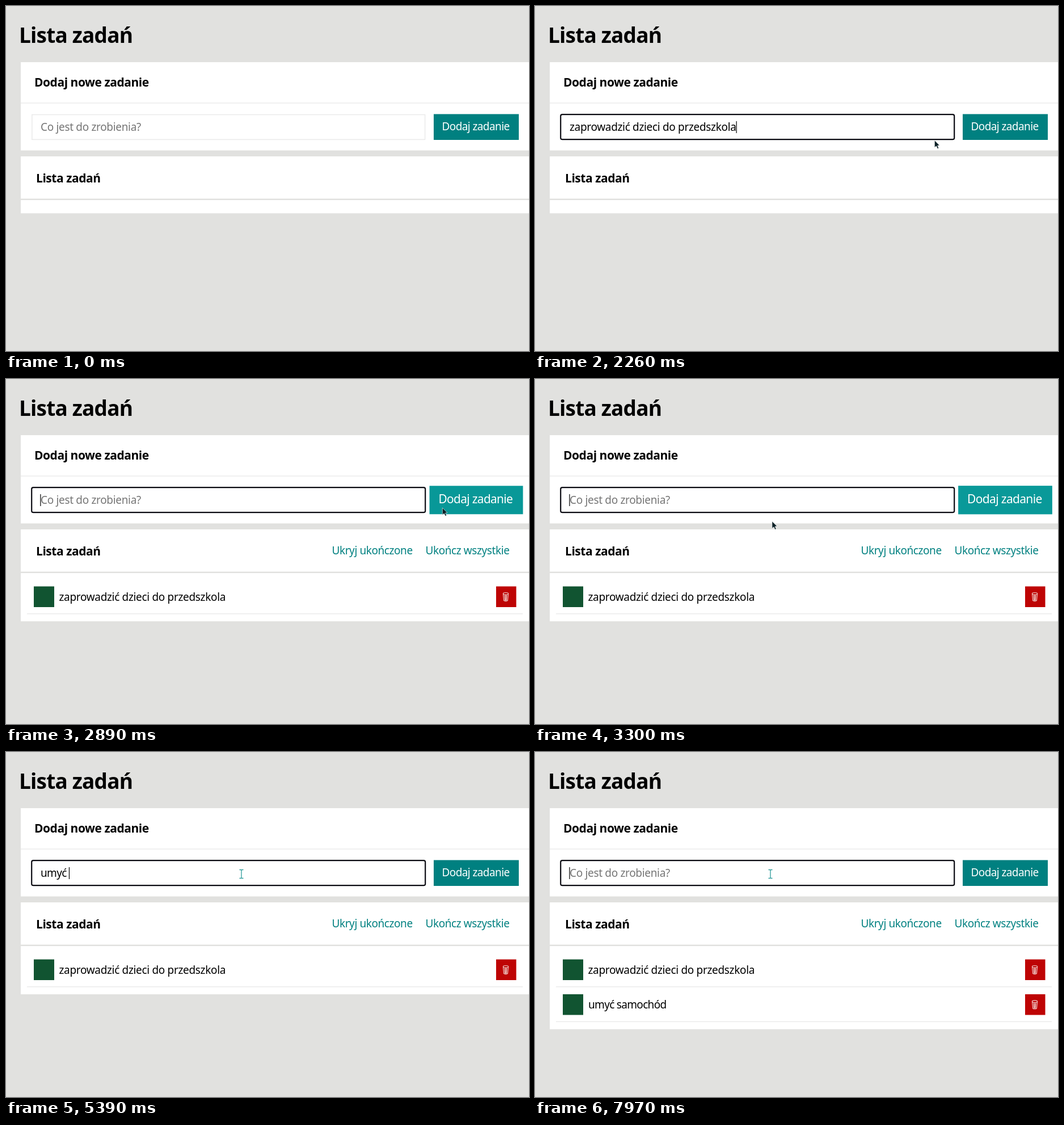
Animation, 922 px wide and 608 px high, one loop 8000 ms. Source, as an HTML page:

```html
<!DOCTYPE html>
<html lang="pl">
<head>
<meta charset="utf-8">
<title>Lista zadań</title>
<style>
html, body { margin: 0; width: 100%; height: 100%; overflow: hidden; background: #e1e1df; }
svg { display: block; width: 922px; height: 608px; }
text { font: 19px "Noto Sans", "Open Sans", sans-serif; letter-spacing: -.33px; white-space: pre; }
.title { font-size: 37px; font-weight: 700; letter-spacing: -.8px; }
.head { font-size: 21px; font-weight: 700; letter-spacing: -.47px; }
.link { fill: #008080; letter-spacing: -.42px; }
.label { fill: #fff; font-weight: 500; letter-spacing: -.6px; }
.short { letter-spacing: -.68px; }
.hint { fill: #757575; }
</style>
</head>
<body>
<svg viewBox="0 0 922 608">
  <defs>
    <g id="row">
      <rect x="49" y="365.5" width="36" height="36.5" fill="#115431"/>
      <rect x="864" y="365.5" width="35.5" height="36.5" fill="#be0404"/>
      <g fill="none" stroke="#f3dcd8" stroke-width="1.1">
        <path d="M876.5 379.2 877.7 390.5Q881 392.3 884.3 390.5L885.5 379.2M879.2 381 879.7 390M881 381V390.5M882.8 381 882.3 390"/>
        <ellipse cx="881" cy="378.3" rx="4.6" ry="1.8"/>
      </g>
      <path d="M37 413.8H911" stroke="#ebebeb" stroke-width="1.6"/>
    </g>
  </defs>
  <rect width="922" height="608" fill="#e1e1df"/>
  <text class="title" x="23" y="65">Lista zadań</text>

  <path d="M26 99H922V254.5H26Z" fill="#fff"/>
  <path d="M26 171H922" stroke="#ebebeb" stroke-width="1.6"/>
  <text class="head" x="50" y="142">Dodaj nowe zadanie</text>
  <rect id="field" fill="#fff"/>
  <text class="hint" id="hint" x="61" y="220">Co jest do zrobienia?</text>
  <text id="typed" x="61" y="220"></text>
  <rect id="caret" y="203" width="1.2" height="21"/>
  <g id="button">
    <rect id="face" x="754" y="190.5" width="150" height="45.5"/>
    <text class="label" x="768.5" y="218.5">Dodaj zadanie</text>
  </g>

  <rect id="panel" x="26" y="265" width="896" fill="#fff"/>
  <path d="M26 340.8H922" stroke="#e1e1df" stroke-width="2.6"/>
  <text class="head" x="53" y="311">Lista zadań</text>
  <g id="first">
    <text class="link" x="574.5" y="309">Ukryj ukończone</text>
    <text class="link" x="739.5" y="309">Ukończ wszystkie</text>
    <use href="#row"/>
    <text x="93.5" y="391">zaprowadzić dzieci do przedszkola</text>
  </g>
  <g id="second">
    <use href="#row" y="61.4"/>
    <text class="short" x="94" y="452">umyć samochód</text>
  </g>

  <circle id="halo" r="13" fill="#d8e62e" fill-opacity=".6"/>
  <path id="arrow" d="M0 0V12.5L3 10 5.2 14.6 7.3 13.6 5.2 9.2 8.8 8.8Z" fill="#0b2026" stroke="#fff" stroke-opacity=".75" stroke-width=".8"/>
  <path id="beam" d="M-3.5-7.5H-1Q0-7.5 0-6.5Q0-7.5 1-7.5H3.5M0-6.5V6.5M-3.5 7.5H-1Q0 7.5 0 6.5Q0 7.5 1 7.5H3.5" fill="none" stroke-width="1.3"/>
</svg>
<script>
const LOOP = 8000;
const FIRST = "zaprowadzić dzieci do przedszkola";
const SECOND = "umyć samochód";
const FOCUS = 1030, PASTE = 1840, PRESS = 2680, ADD = 2890, SUBMIT = 7440;
const KEYS = [4470, 4600, 4800, 5260, 5390, 5850, 6050, 6180, 6310, 6380, 6510, 6770, 6910];
const BLINK = 530;

// time, x, y
const PATH = [
  [130, 799, 574], [400, 700, 420], [700, 590, 272], [890, 555, 232],
  [1030, 550, 210], [1170, 550, 210], [1300, 545, 222], [1840, 545, 222],
  [2100, 640, 232], [2300, 720, 238], [2400, 754, 236], [2610, 810, 224],
  [2680, 813, 222], [2850, 813, 222], [3050, 600, 246], [3300, 418, 251],
  [3460, 415, 215]
];

const ui = {};
document.querySelectorAll("svg [id]").forEach(el => ui[el.id] = el);

const set = (el, attrs) => {
  for (const name in attrs) el.setAttribute(name, attrs[name]);
};
const show = (el, on) => set(el, { visibility: on ? "visible" : "hidden" });
const mix = (a, b, k) => a + (b - a) * k;
const clamp = v => Math.min(1, Math.max(0, v));

// CSS "ease", cubic-bezier(.25, .1, .25, 1)
function ease(x) {
  let lo = 0, hi = 1, u = .5;
  for (let i = 0; i < 20; i++) {
    u = (lo + hi) / 2;
    const bx = .75 * u * (1 - u) ** 2 + .75 * u * u * (1 - u) + u ** 3;
    if (bx < x) lo = u; else hi = u;
  }
  return .3 * u * (1 - u) ** 2 + 3 * u * u * (1 - u) + u ** 3;
}

function pointer(t) {
  const i = PATH.findIndex(p => p[0] > t);
  if (i < 0) return PATH[PATH.length - 1].slice(1);
  if (i === 0) return PATH[0].slice(1);
  const a = PATH[i - 1], b = PATH[i];
  const k = (t - a[0]) / (b[0] - a[0]);
  return [mix(a[1], b[1], k), mix(a[2], b[2], k)];
}

function drawField(t) {
  const focused = t >= FOCUS && t < PRESS || t >= ADD;
  set(ui.field, focused
    ? { x: 45.2, y: 191.2, width: 694, height: 44, rx: 3, stroke: "#0b0b12", "stroke-width": 2.2 }
    : { x: 45.8, y: 191.5, width: 692.8, height: 43.8, rx: 0, stroke: "#ebebeb", "stroke-width": 1.6 });

  const count = KEYS.filter(k => k <= t).length;
  const text = t < PASTE || t >= SUBMIT ? "" : t < ADD ? FIRST : SECOND.slice(0, count);
  ui.typed.textContent = text;
  set(ui.typed, { class: t >= ADD ? "short" : "" });
  show(ui.hint, !text);

  const last = Math.max(...[FOCUS, PASTE, ADD, ...KEYS].filter(k => k <= t));
  const lit = Math.floor((t - last) / BLINK) % 2 === 0;
  set(ui.caret, { x: text ? 61 + ui.typed.getComputedTextLength() : 60.3 });
  show(ui.caret, focused && lit);
}

function drawButton(t) {
  const k = ease(clamp((t - 2400) / 700)) - ease(clamp((t - 3330) / 780));
  set(ui.button, { transform: `translate(829.2 213) scale(${1 + .105 * k}) translate(-829.2 -213)` });
  set(ui.face, { fill: `rgb(${9 * k},${128 + 25 * k},${128 + 25 * k})` });
}

function drawList(t) {
  show(ui.first, t >= ADD);
  show(ui.second, t >= SUBMIT);
  set(ui.panel, { height: t >= SUBMIT ? 223.5 : t >= ADD ? 162 : 100.3 });
}

function drawPointer(t) {
  const [x, y] = pointer(t);
  const inField = x > 45 && x < 740 && y > 190 && y < 236;
  const at = { transform: `translate(${x} ${y})` };
  set(ui.arrow, at);
  set(ui.beam, { ...at, stroke: t > ADD ? "#2f9c9c" : "#4a4a4a" });
  set(ui.halo, { cx: x - .5, cy: y - .5 });
  show(ui.arrow, t >= 130 && !inField);
  show(ui.beam, inField);
  show(ui.halo, t >= FOCUS && t < 1170 || t >= PRESS && t < 2850);
}

function frame() {
  const t = performance.now() % LOOP;
  drawField(t);
  drawButton(t);
  drawList(t);
  drawPointer(t);
  requestAnimationFrame(frame);
}
frame();
</script>
</body>
</html>
```
